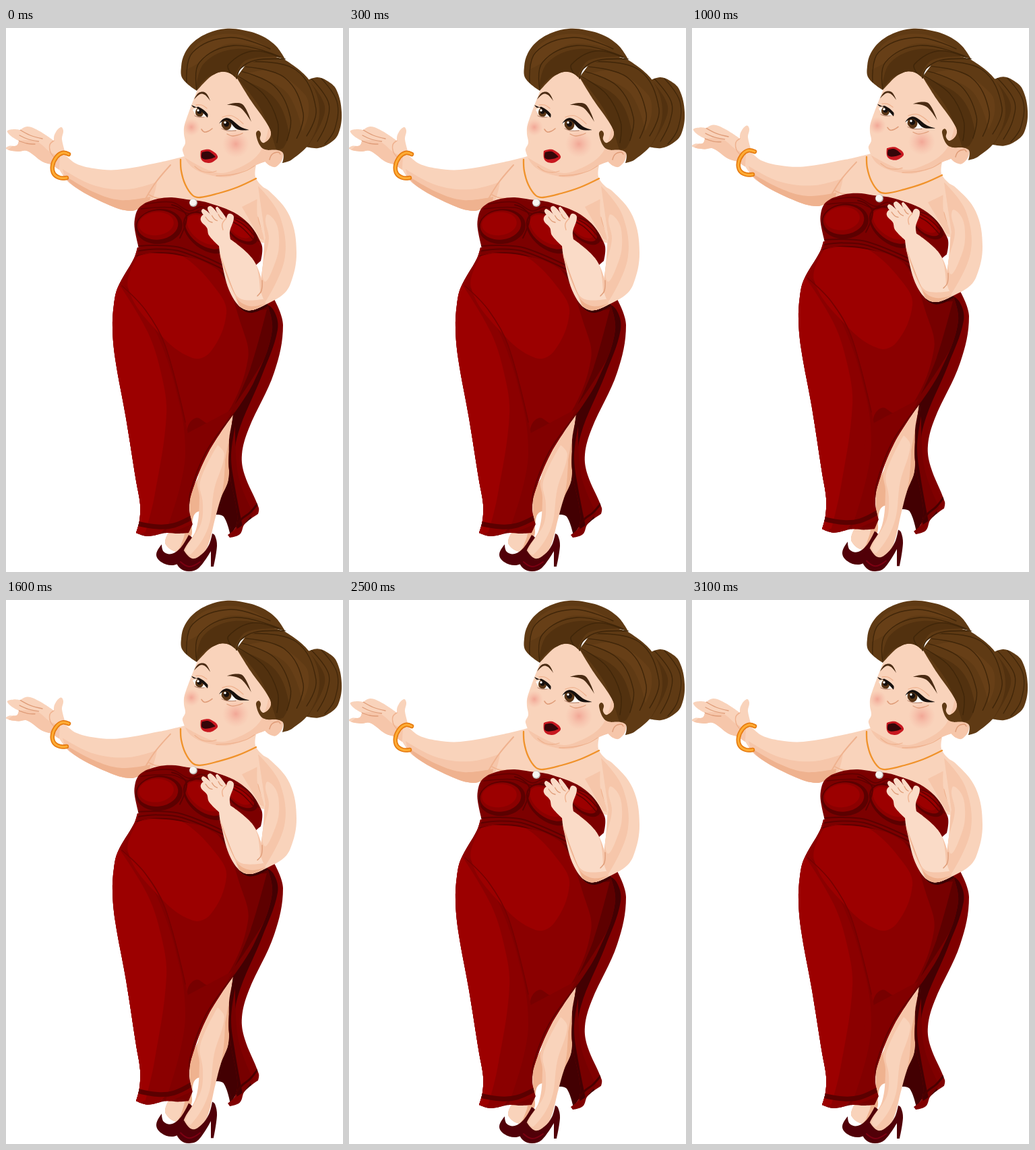
An HTML page with a canvas that plays this animation: 500x806 px, repeating every 3500 ms.

```html
<!DOCTYPE html>
<html lang="en">
<head>
<meta charset="utf-8">
<title>Singer</title>
<style>
html, body { margin: 0; width: 100%; height: 100%; overflow: hidden; background: #fff; }
canvas { display: block; }
</style>
</head>
<body>
<canvas id="stage" width="500" height="806"></canvas>
<script>
const ctx = document.getElementById('stage').getContext('2d');
const STEP = 500, STEPS = 7, HIP = 572, FLOOR = 806;

const SKIN = '#f9d3bb', SKIN_MID = '#f6c6aa', SKIN_LOW = '#efb28f', SKIN_LINE = '#df9c78';
const RED = '#8b0000', RED_HI = '#9c0000', RED_LOW = '#770000', RED_FOLD = '#5c0000', RED_DARK = '#430002';
const HAIR = '#5f3a14', HAIR_HI = '#673f17', HAIR_LOW = '#52310f', HAIR_LINE = '#402609';
const SHOE = '#510008', INK = '#17100d', BROW = '#4a2b13';

let breath = 0;

// The body stretches upwards: most at the hip, nothing at the floor or the crown
function lift(y) {
  const u = y / HIP;
  const rise = u < 1 ? u * u * (3 - 2 * u) : Math.sin(Math.PI / 2 * (FLOOR - y) / (FLOOR - HIP));
  return y - 15 * breath * rise;
}

// Key points are written "x,y"; "!" marks a corner
function parse(text) {
  return text.split(' ').map(s => {
    const [x, y] = s.replace('!', '').split(',').map(Number);
    return { x, y, corner: s.endsWith('!') };
  });
}

// Smooth curve through the key points
function curve(keys, closed) {
  const pts = keys.map(p => ({ ...p, y: lift(p.y) }));
  const n = pts.length, at = i => pts[(i + n) % n];
  const dir = i => {
    if (at(i).corner || (!closed && (i === 0 || i === n - 1))) return [0, 0];
    const a = at(i - 1), b = at(i + 1), d = Math.hypot(b.x - a.x, b.y - a.y) || 1;
    return [(b.x - a.x) / d, (b.y - a.y) / d];
  };
  const path = new Path2D();
  path.moveTo(pts[0].x, pts[0].y);
  for (let i = 0; i < (closed ? n : n - 1); i++) {
    const a = at(i), b = at(i + 1), u = dir(i), v = dir((i + 1) % n);
    const h = Math.hypot(b.x - a.x, b.y - a.y) * 0.36;
    path.bezierCurveTo(a.x + u[0] * h, a.y + u[1] * h, b.x - v[0] * h, b.y - v[1] * h, b.x, b.y);
  }
  if (closed) path.closePath();
  return path;
}

function fill(color, text) {
  ctx.fillStyle = color;
  ctx.fill(curve(parse(text), true));
}

function stroke(color, width, pts) {
  ctx.strokeStyle = color;
  ctx.lineWidth = width;
  ctx.stroke(curve(pts, false));
}

function line(color, width, text) {
  stroke(color, width, parse(text));
}

// A fan of lines blending from one curve to another
function fan(color, width, from, to, count) {
  const a = parse(from), b = parse(to);
  for (let i = 0; i < count; i++) {
    const k = i / (count - 1);
    stroke(color, width, a.map((p, j) => ({ x: p.x + (b[j].x - p.x) * k, y: p.y + (b[j].y - p.y) * k })));
  }
}

function oval(color, x, y, rx, ry = rx, turn = 0) {
  ctx.fillStyle = color;
  ctx.beginPath();
  ctx.ellipse(x, lift(y), rx, ry, turn, 0, 7);
  ctx.fill();
}

function blush(x, y, r) {
  const g = ctx.createRadialGradient(x, lift(y), 0, x, lift(y), r);
  g.addColorStop(0, 'rgba(240,155,140,.8)');
  g.addColorStop(1, 'rgba(246,180,160,0)');
  oval(g, x, y, r);
}

// Base shape with details kept inside its outline
function part(color, text, details) {
  fill(color, text);
  ctx.save();
  ctx.clip(curve(parse(text), true));
  details();
  ctx.restore();
}

function leftArm() {
  part(SKIN, '90,190! 104,201 130,208 165,210 228,199 265,190! 300,200! 372,200! 371,223 404,262 392,320! ' +
    '225,285 206,262! 186,271 150,261 96,231 78,208!', () => {
    fill(SKIN_MID, '84,209! 130,233 180,239 224,228! 202,278 150,275 96,236');
    fill(SKIN_LOW, '84,217! 130,243 170,255 214,250! 202,278 150,275');
    fill(SKIN_MID, '350,265! 383,248 395,240! 394,320! 377,312!');
    line(SKIN_LOW, 2, '244,203 222,229 207,253');
    line(SKIN_LOW, 1.5, '212,247 221,251 235,253');
  });
}

function leftHand() {
  part(SKIN, '90,191! 83,165 85,152 81,147 72,158 71,167! 50,153 32,146 21,151! 11,150 2,154 19,167! ' +
    '16,174 4,175 0,179 18,183 31,182 54,198 67,202! 79,210!', () => {
    fill(SKIN_MID, '19,167! 45,168 66,184 80,190! 79,212! 40,195 0,183!');
    fan(SKIN_LINE, 1.3, '21,151 36,159 54,164', '19,167 31,171 43,172', 3);
    line(SKIN_LOW, 1.5, '71,167 65,173 66,184 72,192');
  });
  const ring = '93,187 84,185 75,191 69,204 71,216 80,222 90,222';
  line('#e77c12', 6.5, ring);
  line('#ffad35', 3, ring);
}

function legs() {
  fill(RED_DARK, '337,575! 352,690! 342,738! 333,752! 323,724 311,721! 302,700!');
  part(SKIN_LOW, '300,640! 300,716! 282,718 276,735 275,752 258,775 237,765 241,748! 273,738! 272,690!', () => {
    fill(SKIN, '238,744! 266,742! 263,757 251,777 235,774');
  });
  fill(SHOE, '231,765! 234,776 246,779 260,769 271,751! 277,758 258,791 246,796 230,791 223,780');
  part(SKIN_MID, '339,570! 331,610 330,668 319,696 311,724 298,771 284,786 267,786 263,776 282,743 287,696 284,670 306,606', () => {
    fill(SKIN, '314,618! 324,632 309,683 300,740 274,780 267,773 289,735 292,705 288,672');
    fill(SKIN_LOW, '338,572! 334,675! 314,718 308,736! 322,681 325,641!');
  });
  fill(SHOE, '306,749! 301,766 290,780 276,786 264,774! 253,789 259,801 272,805 286,800 304,775! 304,798! 308,798! 313,767 310,752');
  line('#7c0012', 2, '259,791 272,798 288,791');
}

function skirt() {
  part('#800000', '398,402! 411,440 398,510 360,594 350,632 354,662 375,711 374,720! 354,735 347,750 332,755! ' +
    '329,751! 340,741 343,720 331,655 332,615 337,573! 350,420!', () => {
    fill(RED_DARK, '380,405! 397,418 403,447 380,514 344,602 341,649 365,728! 343,742! 330,655! 329,570! 365,500!');
    fill(RED_LOW, '340,590! 334,635 339,676 351,738! 367,719! 345,665');
    line('#4a0000', 3, '341,738 350,727 362,718 374,704');
  });
  part(RED_LOW, '195,325! 190,341 166,384 160,410 158,445 162,490 178,578 193,671 199,706 198,730 193,748! ' +
    '210,753 238,748 255,749 271,748! 277,735! 272,714 275,690 300,629 337,573! 368,524 395,447 384,400! 300,340!', () => {
    fill(RED, '190,325! 140,410! 190,760! 230,748 266,685 268,598 281,578 302,586 329,570 359,490 350,443 315,359 268,337');
    fill('#820000', '175,380! 211,421 240,480 270,600! 336,565! 273,705 276,735! 235,752! 266,630 238,496');
    fill(RED, '175,382! 224,453 260,578 253,650 234,708 213,747! 190,747! 180,600!');
    fill(RED_HI, '168,380! 210,450 230,511 238,573 220,695 207,747! 185,755! 140,430!');
    fill(RED_HI, '196,338! 229,333 265,340 314,390 327,423 304,479 277,489 226,451 181,384');
    fill('#5e0000', '314,346! 350,412 387,417! 363,503 339,559! 400,455 398,398!');
    fill('#3c0002', '308,340! 326,371 342,408 362,422 388,412! 397,395!');
    line(RED_LOW, 1.6, '172,382 207,418 236,470 266,584');
    line('#5b0000', 7, '194,734 225,739 249,737 276,725');
    line('#650000', 2, '339,570 297,628 273,690 274,714');
  });
}

// Three nested ovals: shadow, cloth, light
function cup(x, y, rx, ry, turn) {
  [RED_FOLD, RED, RED_HI].forEach((c, i) =>
    oval(c, x - 2 * i, y - 2 * i, rx * (1 - .13 * i), ry * (1 - .17 * i), turn));
}

function bodice() {
  part('#7c0000', '207,259! 196,268 191,283 191,298 197,326! 193,339! 215,333 285,343 320,362! 338,380! ' +
    '378,345! 379,320 350,281 300,259 268,254 246,251 225,253', () => {
    cup(227, 294, 35, 26, -.1);
    cup(298, 303, 40, 25, .65);
    cup(350, 301, 27, 15, .65);
    fan('#600000', 1.6, '207,261 246,258 272,271 291,265 349,289 375,316', '200,268 246,266 272,275 291,270 345,292 370,318', 2);
    fan(RED_FOLD, 2, '195,323 224,322 261,326 329,355', '194,338 224,333 261,337 329,367', 3);
    line(RED_FOLD, 2, '258,311 268,280 258,267 246,262');
  });
}

function rightArm() {
  part(SKIN, '374,234! 390,241 421,279 431,333 422,379 407,398 366,418! 357,402! 377,381! 383,316 373,278', () => {
    fill(SKIN_MID, '374,234! 406,278 413,344 381,412! 365,420! 375,375! 385,310!');
    fill(SKIN, '386,278 399,286 405,310 401,343 382,373 390,312');
    line(SKIN_LOW, 3, '373,281 381,320 378,350');
  });
  part('#fadbc7', '316,323! 301,307 298,296 289,285 292,277 296,280! 290,272 293,268 304,277! 299,267 304,264 315,276! ' +
    '311,267 314,265 327,282! 331,275 338,280 332,302 333,313! 365,341 380,376 379,393 386,409! 357,418 334,395 319,343', () => {
    fill(SKIN_MID, '313,320! 335,383 350,402 391,400! 385,425! 350,425!');
    fill(SKIN_LOW, '317,335! 341,398 361,412 386,408! 352,426!');
    fill(SKIN_MID, '333,313! 369,347 377,393! 386,393! 384,355!');
    fan(SKIN_LINE, 1.3, '296,280 301,286 306,288', '315,276 318,281 321,283', 3);
    line(SKIN_LOW, 1.4, '327,282 321,290 322,299');
  });
  line(SKIN_LINE, 1.4, '380,374 379,389 373,397');
}

function face() {
  part(SKIN, '330,60! 300,68! 284,92! 265,143 264,157 266,170 262,182 277,207 312,220 336,219 371,203 390,196! 404,170! 390,120!', () => {
    fill(SKIN_MID, '392,135! 376,185 334,212 307,213 262,190! 270,225! 345,225! 410,190!');
    blush(341, 172, 20);
    blush(275, 147, 13);
    line(SKIN_LOW, 1.3, '280,205 290,212 302,214 312,212');
  });
  line(SKIN_LOW, 1.3, '369,204 355,212 337,217 312,219');
  part(SKIN_MID, '385,187! 403,178 410,183 411,191 406,201 397,206 383,196', () => {
    line(SKIN_LINE, 1.5, '391,195 395,187 404,184 407,187');
  });
}

function eye(text, x, y, r) {
  part('#fffdf9', text, () => {
    oval('#593516', x, y, r, r + 1);
    oval(INK, x, y - 1, r * .55);
    oval('#fff', x - 2, y - 3, 1.7);
  });
}

function features() {
  fill(BROW, '279,106! 286,96 296,96 303,108! 295,99 288,98');
  fill(BROW, '328,114! 340,111 352,114 364,139! 350,120 339,115');
  eye('277,121! 284,119 292,121 298,129 285,131', 287, 125, 6);
  eye('317,140! 324,136 333,137 345,150! 335,152 325,151', 327, 143, 7.5);
  fill(INK, '275,114! 279,118 286,117 299,127 299,133! 286,120');
  fill(INK, '316,142! 322,135 331,134 349,147 361,151! 343,150 328,137');
  fan('#a8715a', 1, '280,130 286,132 294,132', '320,149 328,152 341,152', 2);
  fan(SKIN_LOW, 1.3, '282,114 290,114 298,119', '321,132 335,130 352,142', 2);
  line(SKIN_LINE, 1.3, '328,157 337,160 351,156');
  line(SKIN_LINE, 1.6, '290,150 294,154 300,153 306,149');
  fill('#c81820', '289,182! 296,180 304,181 314,190 309,197 300,200 290,195');
  fill('#350609', '291,184! 301,183 311,191! 302,194 291,193');
}

function hair() {
  part(HAIR, '448,77! 462,73 476,78 490,91 498,125 493,157 480,171 463,178 445,176! 425,130!', () => {
    fill(HAIR_LOW, '445,73! 472,112 467,142 441,185! 425,130!');
    fan(HAIR_LINE, 1.3, '452,74 478,109 476,139 462,168', '468,75 491,109 488,149 473,172', 2);
  });
  part(HAIR, '342,73! 363,107 388,143 393,158 383,170 377,165 378,156 374,152 371,158 379,177 390,181! ' +
    '410,184 410,200! 424,195 451,169 465,122 449,76 412,46! 370,35!', () => {
    fill(HAIR_HI, '356,68! 393,64 443,98 449,126 440,153! 415,94');
    fill(HAIR_LOW, '343,74! 396,101 419,151 412,177 401,180! 379,122');
    fan(HAIR_LINE, 1.4, '345,72 382,98 403,139 402,170', '361,50 430,62 460,120 446,160', 4);
  });
  part(HAIR, '283,93! 262,75 260,57 265,38 279,20 301,7 326,1 351,3 378,11 400,26 414,46! 393,43 348,60 342,75! 332,67 319,65 305,71 293,82', () => {
    fill(HAIR_HI, '267,62! 286,22 341,9 394,32! 329,24 284,53');
    fill(HAIR_LOW, '282,92! 294,52 342,31 411,43! 356,48 339,74! 305,70');
    fan(HAIR_LINE, 1.4, '283,91 287,51 338,26 405,42', '268,81 277,36 333,14 392,31', 2);
    line(HAIR_LINE, 1.5, '334,68 330,54 367,34 412,46');
  });
  line(HAIR_LINE, 1.6, '342,75 348,60 369,48 414,46');
}

function necklace() {
  line('#f0922a', 2.3, '259,195 260,212 266,232 277,248 288,251 315,245 343,236 371,223');
  oval('#b9b6b2', 278, 259, 6);
  oval('#f7f5f2', 277.5, 258.5, 5);
}

function draw() {
  ctx.fillStyle = '#fff';
  ctx.fillRect(0, 0, 500, 806);
  ctx.lineCap = ctx.lineJoin = 'round';
  [leftArm, leftHand, legs, skirt, bodice, rightArm, face, features, hair, necklace].forEach(f => f());
}

// Held poses: in over two steps, out over two, then rest
function breathAt(t) {
  const step = Math.floor(t / STEP) % STEPS;
  return Math.pow(Math.max(0, 2.5 - Math.abs(step - 2.5)) / 2, 1.25);
}

const start = performance.now();
let shown = -1;
function tick() {
  breath = breathAt(performance.now() - start);
  if (breath !== shown) draw();
  shown = breath;
  requestAnimationFrame(tick);
}
tick();
</script>
</body>
</html>
```
